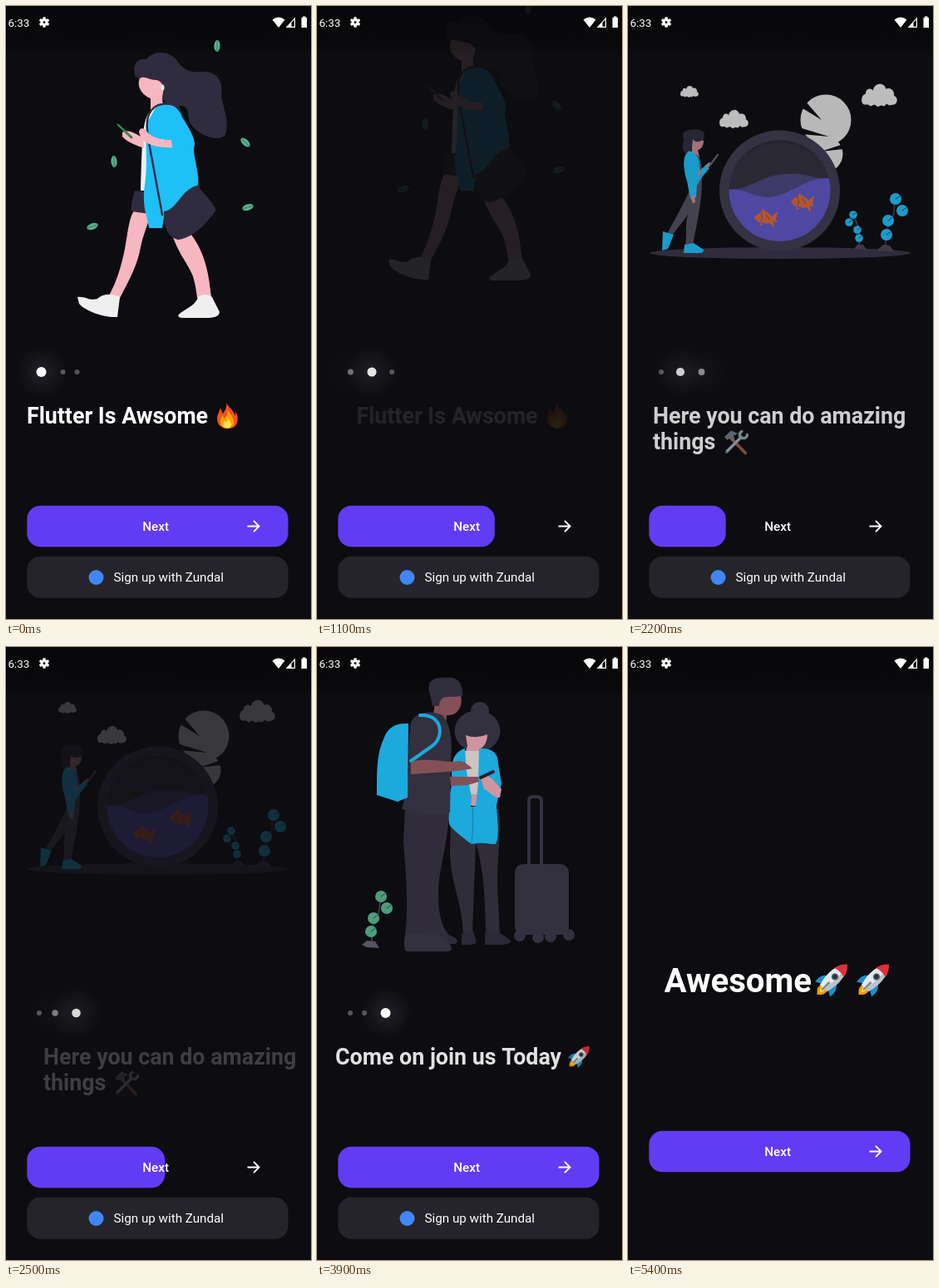
An HTML page with a canvas for the animation above (5.8 s loop, 367 px wide and 737 px high).

```html
<!DOCTYPE html>
<html lang="en">
<head>
<meta charset="utf-8">
<title>Onboarding</title>
<style>
html, body { margin: 0; width: 100%; height: 100%; overflow: hidden; background: #0d0c10; }
canvas { display: block; width: 367px; height: 737px; }
</style>
</head>
<body>
<canvas id="stage"></canvas>
<script>
const W = 367, H = 737, LOOP = 5800;
const DPR = window.devicePixelRatio || 1;
const CYAN = '#1fbff8', INK = '#2f2c3f', SLATE = '#403c52', COAT = '#393547', SKIN = '#f7b7c1';
const BLUSH = '#eaa9b2', BROWN = '#955a62', GREEN = '#55b38c', PALE = '#efefef', PURPLE = '#623cf4';
let g;

// Drawing helpers, all working on the current context g
function fill(color, d) { g.fillStyle = color; g.fill(new Path2D(d)); }
function line(color, width, d) {
  g.strokeStyle = color;
  g.lineWidth = width;
  g.stroke(new Path2D(d));
}
function oval(color, x, y, rx, ry = rx, turn = 0) {
  g.fillStyle = color;
  g.beginPath();
  g.ellipse(x, y, rx, ry, turn, 0, 7);
  g.fill();
}
function box(color, x, y, w, h, r) {
  g.fillStyle = color;
  g.beginPath();
  g.roundRect(x, y, w, h, r);
  g.fill();
}
function text(str, x, y, size, weight) {
  g.font = `${weight} ${size}px Roboto, sans-serif`;
  g.fillStyle = '#fff';
  g.fillText(str, x, y);
}
function placed(x, y, scale, draw) {
  g.save();
  g.translate(x, y);
  g.scale(scale, scale);
  draw();
  g.restore();
}
function layer(draw) {
  const c = document.createElement('canvas');
  c.width = W * DPR;
  c.height = H * DPR;
  const outer = g;
  g = c.getContext('2d');
  g.scale(DPR, DPR);
  g.lineCap = g.lineJoin = 'round';
  draw();
  g = outer;
  return c;
}

// Emoji, each in a 100 unit box
function fire() {
  fill('#f4511e', 'M46 0C52 16 72 27 80 50C83 43 81 37 78 32C92 45 94 75 80 90C70 99 60 100 50 100C26 100 10 84 10 62C10 46 19 36 21 22C27 28 30 35 31 43C41 32 48 18 46 0Z');
  fill('#ffa000', 'M51 24C54 42 75 52 75 74C75 91 63 99 49 99C30 99 21 87 22 72C23 61 28 57 29 49C34 53 36 57 37 62C46 54 52 42 51 24Z');
  fill('#ffe156', 'M51 55C52 67 65 72 65 84C65 94 57 99 49 99C38 99 32 92 33 84C34 77 38 76 39 70C43 72 44 74 44 77C49 72 52 65 51 55Z');
}
function rocket() {
  g.translate(50, 50);
  g.rotate(Math.PI / 4);
  fill('#ff9800', 'M-13 38C-18 52 -7 59 0 67C7 59 18 52 13 38Z');
  fill('#ffe060', 'M-6 38C-8 47 -3 51 0 55C3 51 8 47 6 38Z');
  fill('#1a8fc9', 'M-17 0C-32 9 -36 22 -33 43L-13 31ZM17 0C32 9 36 22 33 43L13 31Z');
  fill('#b9c3c9', 'M0 -64C20 -47 29 -8 15 39H-15C-29 -8 -20 -47 0 -64Z');
  fill('#e4e9eb', 'M0 -64C8 -40 10 0 2 39H-15C-29 -8 -20 -47 0 -64Z');
  fill('#dc2f3c', 'M0 -67C12 -56 18 -45 21 -30Q0 -37 -21 -30C-18 -45 -12 -56 0 -67Z');
  oval('#5d6f79', 0, -12, 11);
  oval('#27343b', 0, -12, 7);
  fill('#7c8b93', 'M-4 12H4L3 46H-3Z');
}
function tools() {
  line('#a05b43', 12, 'M40 42L88 92');
  fill('#6c7d87', 'M6 30L32 5L57 15L49 23L42 21L46 40L38 48L26 36L17 41Z');
  line('#91a2ab', 12, 'M15 87L72 30');
  line('#b3c1c8', 4, 'M14 85L69 31');
  line('#91a2ab', 11, 'M74 8C61 14 64 34 78 34C88 36 95 28 95 21');
  oval('#455a64', 13, 88, 4);
}

// Illustrations
function leaf(x, y, turn) {
  oval(GREEN, x, y, 7, 3.6, turn);
  g.save();
  g.translate(x, y);
  g.rotate(turn);
  line('#357b63', 1, 'M-6 0H6');
  g.restore();
}
function walker() {
  [[254, 48, 1.6], [288, 164, .75], [130, 187, 1.5], [291, 242, -.3], [104, 265, -.35]].forEach(l => leaf(...l));
  fill(INK, 'M155 84C152 70 158 62 169 64C176 54 196 52 206 66C213 77 224 81 237 79C254 78 262 91 259 108C262 125 269 139 264 155C253 165 231 154 223 143C216 134 223 122 212 120C201 123 193 116 187 112L165 91Z');
  fill(SKIN, 'M161 87C157 96 163 107 174 111L174 128L190 121C187 112 188 109 189 104C191 95 186 90 181 89C174 90 167 83 161 87Z');
  oval(PALE, 188.5, 98, 2, 3.5);
  fill(SKIN, 'M154 246C146 258 146 285 140 305C136 322 131 335 123 350L136 353C148 330 158 312 162 290C165 275 171 262 174 250ZM201 278C208 298 219 310 225 325C228 335 229 343 230 351L247 350C244 322 240 298 223 275Z');
  fill(PALE, 'M86 350C95 348 100 355 110 352C116 346 128 345 137 350L134 374C118 375 96 367 88 358ZM207 372C214 364 227 362 231 350C236 346 244 346 248 350L257 368C256 374 250 375 240 375H212Q208 375 207 372Z');
  fill(INK, 'M155 222L175 224L174 250L151 247C150 237 153 229 155 222Z');
  fill(PALE, 'M177 125C164 130 164 155 162 222H170L184 127Z');
  line(INK, 2.4, 'M207 121C217 140 224 165 232 218');
  fill(CYAN, 'M182 119C196 112 209 123 212 134C222 149 230 163 226 171C225 179 235 210 230 217C218 220 212 230 210 239C204 247 197 247 191 248L188 267H172C170 250 165 248 166 222C172 190 166 160 170 140Z');
  fill(INK, 'M190 247C205 246 212 219 230 216C239 225 247 235 253 245C242 261 225 279 207 281C194 278 189 262 190 247Z');
  line(INK, 2.4, 'M183 119C169 126 168 140 171 159L188 251M184 119Q197 115 207 122');
  fill(SKIN, 'M140 152C145 147 158 154 165 159L166 171C158 168 146 164 140 157ZM160 152C160 146 167 145 171 153C180 160 190 161 199 161L200 170C187 171 171 168 163 160Z');
  line('#20683f', 2.6, 'M135 143L151 158');
  line('#4cbd69', 1, 'M134 142L150 157');
}
function cloud(x, y, w) {
  placed(x, y, w / 44, () => fill('#e9e9e9', 'M3 25C-2 23 0 12 5 12C5 5 12 4 14 8C16 -3 29 -2 30 6C36 3 41 9 40 14C46 17 44 24 40 25L34 26L31 24L28 27L24 26L20 28L16 25L11 27L8 25Z'));
}
function sprig(color, stem, dots, r) {
  line(SLATE, 2, stem);
  dots.forEach(([x, y]) => {
    oval(color, x, y, r);
    line(SLATE, 1, `M${x} ${y}l${r * .7} ${-r * .5}`);
  });
}
function fish(x, y) {
  placed(x, y, 1, () => {
    fill('#d9683e', 'M-13 1C-8 -8 3 -9 8 -1L15 -7L13 2L15 6L10 5L11 13L5 7C-2 10 -9 6 -13 1ZM-5 -5L-3 -10L5 -4ZM-4 6L-8 11L1 7Z');
    line('#8d4650', 1, 'M-5 -5Q-2 0 -5 5M1 -4L5 3');
  });
}
function aquarium() {
  g.translate(0, 10);
  cloud(63, 96, 22);
  cloud(110, 125, 35);
  cloud(281, 94, 43);
  oval('#e4e4e4', 238, 137, 30.5);
  oval('#e4e4e4', 237, 178, 21.5);
  fill('#0d0c10', 'M214 115L233 137L210 123ZM206 146L242 157L208 154ZM232 175L259 166L259 172Z');
  oval('#393549', 183, 297, 157, 7);
  oval(SLATE, 182.5, 222, 72.5);
  oval('#322f3f', 182.5, 222, 61);
  g.save();
  g.beginPath();
  g.arc(182.5, 222, 61, 0, 7);
  g.clip();
  fill('#4a467f', 'M120 221C150 221 162 201 193 202C213 199 227 211 245 206V290H120Z');
  fill('#5f57c7', 'M120 221C139 217 150 231 170 230C197 228 215 203 245 208V290H120Z');
  g.restore();
  line('#2c2938', 1.5, 'M142 177Q182 148 225 178');
  fish(165, 254);
  fish(209, 235);
  // visitor
  fill(INK, 'M66 154C69 147 89 146 92 153L91 163L79 165L73 179C66 178 64 169 67 162Z');
  fill('#c98c96', 'M78 160C82 167 89 160 91 162C91 169 87 173 84 173L86 182L76 180Z');
  fill('#53505f', 'M78 178C86 176 90 188 89 207C90 230 83 260 78 288H69C72 267 67 258 75 246C66 261 60 265 53 277L47 274C61 249 66 239 74 222Z');
  fill(CYAN, 'M74 174C65 179 67 193 69 204C73 215 73 227 76 233L82 230L83 216L88 207C85 195 88 184 81 178Z');
  line('#c98c96', 4, 'M85 202L98 190M78 229L79 235');
  fill(CYAN, 'M87 199L94 191L98 195L88 207Z');
  line('#656176', 2.2, 'M99 191L108 179');
  fill(CYAN, 'M42 271L55 275L48 292L41 294ZM68 287L79 285L91 293Q91 297 87 297H67Z');
  // plants
  sprig(CYAN, 'M278 289Q281 263 268 250', [[271, 251], [266, 260], [276, 269], [278, 279]], 4.8);
  sprig(CYAN, 'M310 290Q310 264 320 250L321 230', [[322, 232], [330, 246], [313, 258], [311, 275]], 7);
  fill('#4b4656', 'M272 292L276 287H283L287 293ZM299 294L307 287L315 288L320 295Z');
}
function travellers() {
  g.translate(0, 6);
  // suitcase
  line(COAT, 4, 'M255 262V185Q255 180 260 180H265Q270 180 270 185V262');
  box(COAT, 238, 261, 65, 85, 10);
  [[244, 347], [266, 349], [281, 348], [303, 346]].forEach(([x, y]) => oval(COAT, x, y, 7));
  // woman
  oval(COAT, 193, 101, 27.5, 25);
  oval(COAT, 196, 77, 11);
  fill(BLUSH, 'M179 106Q192 111 205 105C205 114 201 121 195 123L196 131L177 131L181 119Z');
  fill('#35313f', 'M161 195H219C221 235 217 255 217 285L220 346L204 349C201 315 204 280 191 235C190 270 188 310 187 347L176 349C176 310 161 284 160 250Z');
  fill(INK, 'M174 345L188 342L192 355Q190 359 174 358ZM202 343L218 342L233 353Q234 357 224 358H202Z');
  fill('#e7dfd9', 'M177 125H196L195 181H181Z');
  fill(BLUSH, 'M181 177H195V192L181 190Z');
  fill(CYAN, 'M178 122C164 126 160 139 163 163C158 180 156 204 160 215C168 224 177 230 186 237C200 234 207 237 215 237C220 228 217 210 216 190L222 164L218 140C218 126 209 121 195 122L194 163L191 192H185L186 180L180 150Z');
  line('#178db8', 1, 'M187 192Q189 215 186 236');
  fill(BLUSH, 'M197 157C204 151 207 156 212 160L222 171L220 181C213 182 207 173 201 171Z');
  // man
  fill('#353143', 'M106 192L159 195C158 235 149 255 146 290C145 322 151 339 160 347C169 349 171 355 166 357H145L106 347C111 310 106 260 104 235Z');
  fill(COAT, 'M106 346L145 342C150 352 162 356 162 362Q162 366 155 366H108Q103 364 106 346Z');
  fill(BROWN, 'M143 62C148 57 164 55 173 58C176 72 169 83 156 82L155 94L139 86Z');
  fill('#363244', 'M136 57C130 40 143 36 155 37C168 35 176 42 175 59L161 60C151 59 147 64 147 71L139 71Z');
  fill(COAT, 'M113 91C119 77 138 76 151 82C162 96 163 114 161 139L160 199C140 205 121 199 102 195C109 170 112 144 110 123Z');
  fill(CYAN, 'M110 92C93 91 84 98 80 111C72 129 72 146 72 178L97 186L109 181Z');
  line(CYAN, 4, 'M124 82C148 80 155 104 140 118L113 137');
  fill(BROWN, 'M113 138C130 133 150 138 165 138C175 134 182 142 187 146C170 150 140 151 113 153ZM160 156L194 156L195 162L181 166L161 167Z');
  line('#252231', 4, 'M197 157L212 150');
  sprig(GREEN, 'M66 353Q64 335 74 320L77 302', [[77, 300], [84, 314], [68, 326], [65, 342]], 7);
  fill('#625d6b', 'M54 358L60 353L70 354L75 362L60 361Z');
}

// Interface
const DOTS = [[42.5, 68.5, 85.5], [40, 65.5, 91], [40, 57, 82.5]];
const title = s => text(s, 25, 501.5, 26.8, 700);
const PAGES = [
  { art: walker, title() { title('Flutter Is Awsome'); placed(251, 477, .31, fire); } },
  { art: aquarium, title() { title('Here you can do amazing'); text('things', 25, 532.5, 26.8, 700); placed(109, 509, .31, tools); } },
  { art: travellers, title() { title('Come on join us Today'); placed(306, 479.5, .255, rocket); } }
].map(p => ({ art: layer(p.art), title: layer(p.title) }));

// Signed page position: -1 waiting, 0 at rest, 1 gone
const SHIFTS = [
  [[650, 0], [1150, 1]],
  [[1150, -1], [1650, 0], [2100, 0], [2600, 1]],
  [[2600, -1], [2800, -.6], [3000, -.55], [3200, -.42], [3500, -.3], [3900, -.12], [4400, -.02], [4800, 0]]
];
const TURNS = [650, 2100];
const BAR = [[-50, 1], [50, .5], [100, .294], [200, .24], [450, .6], [720, 1]];

const clamp = v => Math.max(0, Math.min(1, v));
const mix = (a, b, k) => a + (b - a) * k;
function keyed(keys, t) {
  if (t <= keys[0][0]) return keys[0][1];
  for (let i = 1; i < keys.length; i++) {
    const [t0, a] = keys[i - 1], [t1, b] = keys[i];
    if (t < t1) return mix(a, b, (t - t0) / (t1 - t0));
  }
  return keys[keys.length - 1][1];
}

// The motion advances in uneven steps
const HOLDS = [2800, 3000, 3200, 3500, 3900, 4400, 4800, 5000, 5400];
function stepped(t) {
  if (t < 600) return 0;
  if (t < 800) return 600;
  if (t < 2800) return Math.floor(t / 100) * 100;
  return HOLDS.filter(h => h <= t).pop();
}

function backdrop() {
  g.fillStyle = '#0d0c10';
  g.fillRect(0, 0, W, H);
  const shade = g.createLinearGradient(0, 0, 0, 58);
  shade.addColorStop(0, '#070709');
  shade.addColorStop(.8, '#09090b');
  shade.addColorStop(1, '#0d0c10');
  g.fillStyle = shade;
  g.fillRect(0, 0, W, 58);
}
function statusBar() {
  text('6:33', 2.5, 25, 13.4, 400);
  g.save();
  g.translate(46, 19.5);
  for (let i = 0; i < 6; i++) {
    g.rotate(Math.PI / 3);
    box('#fff', -1.7, -6.3, 3.4, 4, 1);
  }
  g.restore();
  line('#fff', 3, 'M49 19.5A3 3 0 1 1 43 19.5A3 3 0 1 1 49 19.5');
  fill('#fff', 'M320.5 16.5Q328 10.5 335.5 16.5L328 26ZM348 13.5V26H336.5ZM355.5 14H357V12.5H360.5V14H362V26H355.5Z');
  fill('#0a0a0c', 'M343.5 20L346.8 16.5V24.8H343.5Z');
}
function nextButton(dy, width) {
  box(PURPLE, 25.3, 600.8 + dy, 314.2 * width, 49.5, 16);
  text('Next', 164.3, 631 + dy, 15.2, 500);
  placed(0, dy, 1, () => line('#fff', 1.9, 'M290.5 625.5H304M298 618.8L304.5 625.5L298 632.2'));
}
function dots(t) {
  const turn = t < 1900 ? 0 : 1;
  const k = clamp((t - TURNS[turn] + 90) / 640);
  for (let i = 0; i < 3; i++) {
    const x = mix(DOTS[turn][i], DOTS[turn + 1][i], k);
    const on = i === turn ? 1 - k : i === turn + 1 ? k : 0;
    const glow = g.createRadialGradient(x, 440, 0, x, 440, 31);
    glow.addColorStop(0, `rgba(225,220,255,${.1 * on})`);
    glow.addColorStop(1, 'rgba(225,220,255,0)');
    oval(glow, x, 440, 31);
    oval(`rgba(255,255,255,${mix(.3, 1, on)})`, x, 440, mix(3, 6, on));
  }
}
function onboarding(t) {
  PAGES.forEach((page, i) => {
    const s = keyed(SHIFTS[i], t);
    g.globalAlpha = 1 - Math.abs(s);
    g.drawImage(page.art, 0, -50 * Math.abs(s), W, H);
    g.drawImage(page.title, 25 * s, 0, W, H);
  });
  g.globalAlpha = 1;
  dots(t);
  nextButton(0, keyed(BAR, t - TURNS[t < 1900 ? 0 : 1]));
  box('#25242a', 25.3, 661.8, 314.2, 50, 16);
  oval('#4285f4', 108.5, 687, 9);
  text('Sign up with Zundal', 129.5, 692, 15.2, 400);
}
function finish() {
  text('Awesome', 43.5, 414.5, 40.2, 700);
  placed(226.5, 380.5, .385, rocket);
  placed(276.5, 380.5, .385, rocket);
  nextButton(-19, 1);
}
function render(t) {
  g.setTransform(DPR, 0, 0, DPR, 0, 0);
  backdrop();
  if (t < 5000) {
    onboarding(t);
  } else {
    const settling = t < 5400;
    g.save();
    g.globalAlpha = settling ? .9 : 1;
    g.translate(W / 2, H / 2);
    if (settling) g.scale(.98, .98);
    g.translate(-W / 2, -H / 2);
    finish();
    g.restore();
  }
  statusBar();
}

const stage = document.getElementById('stage');
stage.width = W * DPR;
stage.height = H * DPR;
g = stage.getContext('2d');
const start = performance.now();
function tick() {
  render(stepped((performance.now() - start) % LOOP));
  requestAnimationFrame(tick);
}
tick();
</script>
</body>
</html>
```
